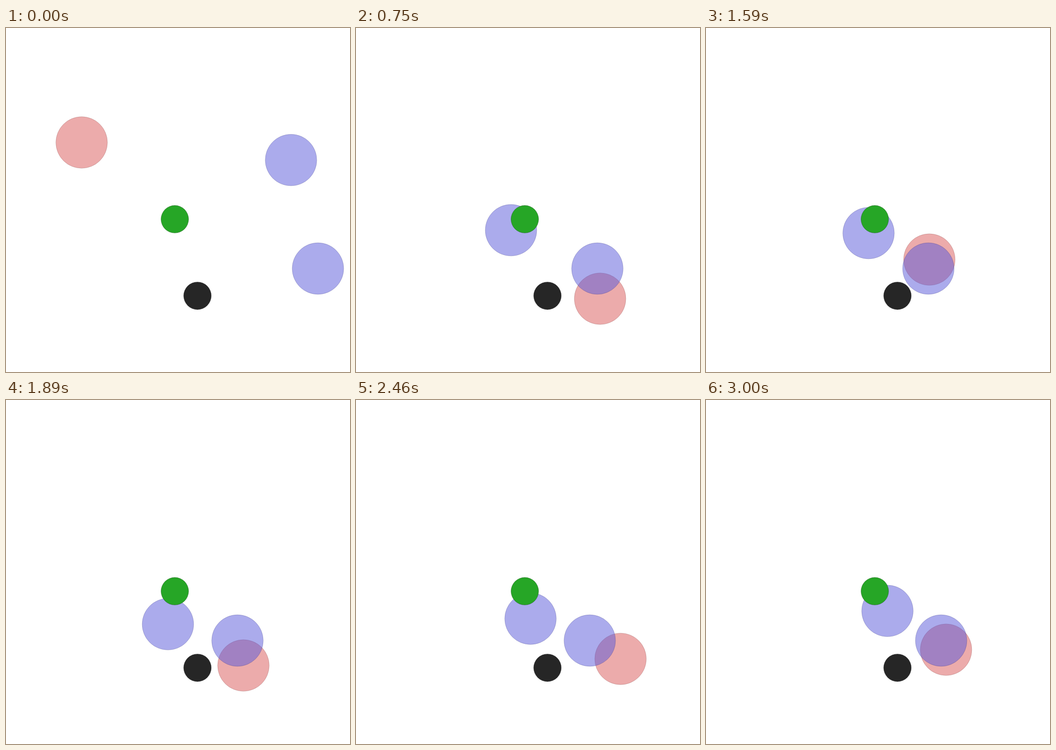
Write an HTML page without scripts that moves like this. It is 700 by 700 pixels and loops after 3.03 s.

```html
<!DOCTYPE html>
<html lang="en">
<head>
<meta charset="utf-8">
<title>Agents and landmarks</title>
<style>
html, body { margin: 0; width: 100%; height: 100%; overflow: hidden; background: #fff; }
svg { display: block; width: 100vw; height: 100vh; }

.agent { r: 52.4px; fill-opacity: .5; stroke-opacity: .25; }
.mark { r: 28px; stroke-opacity: .5; }
.red { fill: #d95959; stroke: #6c2c2c; }
.blue { fill: #5959d9; stroke: #2c2c6c; }
.green { fill: #26a626; stroke: #135313; }
.black { fill: #262626; stroke: #131313; }

.agent {
  --swing: cubic-bezier(.37, 0, .63, 1);
  animation: 3.03s var(--swing) infinite;
}
#chaser { animation-name: chaser-x, chaser-y; }
#guard { animation-name: guard-x, guard-y; }
#decoy { animation-name: decoy-x; cy: 489.5px; }

/* fast approach, then restless swings around the goal */
@keyframes chaser-x {
  0% { cx: 153.7px; animation-timing-function: cubic-bezier(.35, .1, .7, .95); }
  13.86% { cx: 508.6px; }
  17.82% { cx: 522px; }
  36.63% { cx: 437.7px; }
  52.48% { cx: 454.5px; }
  62.38% { cx: 483.1px; }
  70.3% { cx: 505px; }
  81.19% { cx: 538.3px; }
  85.15% { cx: 547px; }
  89.11% { cx: 540px; }
  99.01%, 100% { cx: 488.5px; }
}
@keyframes chaser-y {
  0% { cy: 232.7px; animation-timing-function: cubic-bezier(.35, .1, .7, .95); }
  13.86% { cy: 586px; }
  17.82% { cy: 583px; }
  36.63% { cy: 476px; }
  44.55% { cy: 593px; }
  52.48% { cy: 471.2px; }
  62.38% { cy: 540.2px; }
  66.34% { cy: 578px; }
  71.29% { cy: 530px; }
  76.24% { cy: 596px; }
  81.19% { cy: 526.8px; }
  85.15% { cy: 500px; }
  92.08% { cy: 567px; }
  99.01%, 100% { cy: 508.1px; }
}
@keyframes guard-x {
  0% { cx: 580.2px; animation-timing-function: cubic-bezier(.25, .1, .4, 1); }
  13.86% { cx: 337.7px; }
  23.76% { cx: 315px; }
  36.63% { cx: 343.2px; }
  52.48% { cx: 330.8px; }
  62.38% { cx: 329.5px; }
  72.28% { cx: 326px; }
  81.19% { cx: 355.1px; }
  91.09% { cx: 327px; }
  99.01%, 100% { cx: 369.2px; }
}
@keyframes guard-y {
  0% { cy: 268.5px; animation-timing-function: cubic-bezier(.25, .1, .4, 1); }
  13.86% { cy: 473.4px; }
  23.76% { cy: 411px; }
  36.63% { cy: 440.8px; }
  52.48% { cy: 417.4px; }
  62.38% { cy: 456.2px; }
  72.28% { cy: 416px; }
  81.19% { cy: 445px; }
  91.09% { cy: 460px; }
  99.01%, 100% { cy: 429.2px; }
}
@keyframes decoy-x {
  0% { cx: 635.6px; animation-timing-function: cubic-bezier(.15, .4, .3, 1); }
  13.86% { cx: 507.7px; }
  36.63% { cx: 472.3px; }
  52.48% { cx: 452.5px; }
  62.38% { cx: 471px; }
  81.19% { cx: 475.7px; }
  99.01%, 100% { cx: 478.5px; }
}
</style>
</head>
<body>
<svg viewBox="0 0 700 700">
  <circle id="chaser" class="agent red"/>
  <circle id="guard" class="agent blue"/>
  <circle id="decoy" class="agent blue"/>
  <circle class="mark green" cx="343.5" cy="389.1"/>
  <circle class="mark black" cx="389.6" cy="544.9"/>
</svg>
</body>
</html>
```
